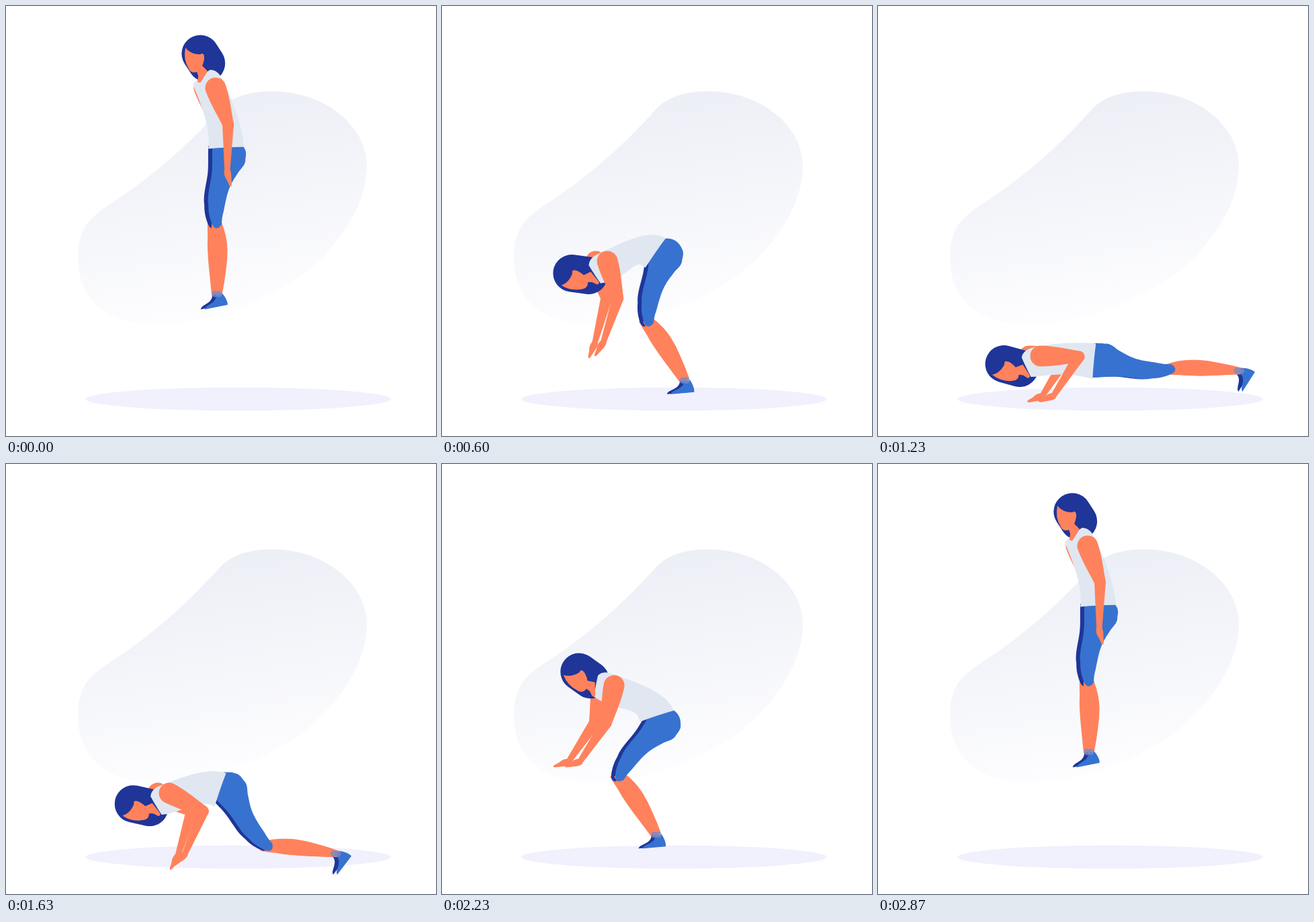
Animation of 640x640 px, one loop 2.93 s. Source, as an HTML page with a canvas:

```html
<!DOCTYPE html>
<html lang="en">
<head>
<meta charset="utf-8">
<title>Burpee</title>
<style>
html, body { margin: 0; width: 100%; height: 100%; overflow: hidden; background: #fff }
canvas { display: block; width: 640px; height: 640px }
</style>
</head>
<body>
<canvas id="stage" width="640" height="640"></canvas>
<script>
const ctx = document.getElementById('stage').getContext('2d');
const LOOP = 2930;
const SKIN = '#ff825c', NAVY = '#1f3598', BLUE = '#3772d0', SHIRT = '#e0e7f1';
const THIGH = 98.5, SHIN = 105, UPPER = 57, FORE = 70;

// A pose: shoulder, hip and ankle points, then upper arm and forearm angles
// in degrees from straight down. Everything else follows from these.
const stand = [312, 122, 331, 227, 317, 428.6, 19, -1];
const drop  = [252, 263, 329, 316, 344, 504, 10, -11.5];
const land  = [246, 358, 332, 360, 353, 551, 14, -16];
const kick  = [247, 443, 333, 428, 449, 570, 26, -27];
const plank = [242, 521, 338, 528, 540.5, 543, 89, -33];
const tuck  = [243, 490, 335, 488, 494, 580, 62, -23];
const squat = [256, 330, 327, 390, 322, 552, -12, -34];
const leap  = [298, 172, 331, 274, 321, 476, 55, 62];
const keys = [[0, stand], [370, drop], [530, land], [870, kick], [1130, plank],
  [1300, plank], [1630, tuck], [2230, squat], [2670, leap], [2870, stand]];

const shape = d => new Path2D(d);
const shorts = shape('M-27-14C-24 5-21 14-20 28C-19 45-21 60-16 74C-14 86-9 95-5 101Q3 111 9 98Q7 90 8 78C8 62 8 52 10 42C12 32 16 24 19 16C23 9 27 3 25-4C25-12 24-16 20-20C10-33-8-34-27-14Z');
const calf = shape('M-6-4Q-7 8-7 20Q-8 30-8 40Q-8 55-7 70L-5 107L5 104Q9 88 12 70Q15 55 15.5 40Q16 20 9 0Z');
const shoe = shape('M5-1C9 4 13 10 13 16L-21 23C-19 15-4 15-4 2Z');
const upperArm = shape('M-15.5 0A15.5 15.5 0 0 1 15.5 0C15.5 20 11 40 8.5 57A8.5 8.5 0 0 1-8.5 57C-10 42-15 22-15.5 0Z');
const foreArm = shape('M-8.5 0A8.5 8.5 0 0 1 8.5 0L4 71L-4 71Z');
const palm = shape('M-4-3Q-7 6-3 13L-1 22Q1 25 2.5 21L4 11Q6 3 4-3Z');
const face = shape('M-22-9C-17-2-8 1 0 1Q6-3 6 7Q5 14 3 18L11 26L1 42Q-2 45-4 41L-3 33L-5 27Q-13 30-17 23Q-26 8-22-9Z');
const blob = shape('M320 152C340 132 370 127 396 127C476 127 537 180 537 237C537 310 478 370 450 393C390 440 300 474 222 474C150 474 107 435 107 376C107 318 136 309 180 278C240 236 285 191 320 152Z');

const glow = ctx.createLinearGradient(300, 130, 360, 475);
glow.addColorStop(0, '#eceef6');
glow.addColorStop(1, '#fefeff');

const rad = a => a * Math.PI / 180;
const angle = (p, q) => Math.atan2(q[0] - p[0], q[1] - p[1]) * 180 / Math.PI;

// Point (x, y) of a frame at p whose down axis is turned by angle a.
function place(p, a, x, y) {
  const c = Math.cos(rad(a)), s = Math.sin(rad(a));
  return [p[0] + x * c + y * s, p[1] - x * s + y * c];
}

function part(path, p, a, color) {
  ctx.save();
  ctx.translate(...p);
  ctx.rotate(-rad(a));
  ctx.fillStyle = color;
  ctx.fill(path);
  ctx.restore();
}

// Monotone cubic interpolation of value n of the poses, at rest at both ends.
function sample(n, t) {
  const last = keys.length - 1;
  let k = 0;
  while (k < last - 1 && t >= keys[k + 1][0]) k++;
  const span = i => keys[i + 1][0] - keys[i][0];
  const rate = i => (keys[i + 1][1][n] - keys[i][1][n]) / span(i);
  const slope = i => {
    if (i === 0 || i === last) return 0;
    const a = rate(i - 1), b = rate(i);
    return a * b <= 0 ? 0 : 2 * a * b / (a + b);
  };
  const h = span(k), u = Math.min(1, (t - keys[k][0]) / h), w = 1 - u;
  return keys[k][1][n] * w * w * (1 + 2 * u) + keys[k + 1][1][n] * u * u * (3 - 2 * u)
    + h * u * w * (slope(k) * w - slope(k + 1) * u);
}

function arm(shoulder, upper, fore) {
  const elbow = place(shoulder, upper, 0, UPPER);
  const wrist = place(elbow, fore, 0, FORE);
  // The palm flattens as the forearm reaches forward.
  part(palm, wrist, 14 + fore * (fore < 0 ? 2.6 : 1), SKIN);
  part(foreArm, elbow, fore, SKIN);
  part(upperArm, shoulder, upper, SKIN);
}

// Two-bone solution with the knee in front.
function kneeOf(hip, ankle) {
  const d = Math.min(Math.hypot(ankle[0] - hip[0], ankle[1] - hip[1]), THIGH + SHIN - .1);
  const along = (THIGH ** 2 - SHIN ** 2 + d * d) / (2 * d);
  return place(hip, angle(hip, ankle), -Math.sqrt(THIGH ** 2 - along ** 2), along);
}

function leg(dx, hip, knee, ankle, color) {
  const shin = angle(knee, ankle);
  const shift = p => [p[0] + dx, p[1]];
  part(calf, shift(knee), shin, SKIN);
  part(shoe, shift(ankle), Math.max(-.2 * shin, 1.05 * shin - 48), color);
  part(shorts, shift(hip), angle(hip, knee), color);
}

function dot(x, y) {
  ctx.fillStyle = 'rgba(118,138,200,.78)';
  ctx.beginPath();
  ctx.arc(x, y, 4.8, 0, 7);
  ctx.fill();
}

// The hair flies up during the drop.
function drawHair(crown, bend, t) {
  const lift = Math.exp(-(((t - 370) / 130) ** 2));
  ctx.strokeStyle = NAVY;
  ctx.lineWidth = 55.5;
  ctx.lineCap = 'round';
  ctx.beginPath();
  ctx.moveTo(...crown);
  ctx.lineTo(...place(crown, 33 + .55 * bend + 83 * lift, 0, 17 + .1 * bend + 10 * lift));
  ctx.stroke();
}

function drawShirt(shoulder, hip, lean, thigh) {
  const tilt = .65 * lean + .35 * thigh;
  const top = (x, y) => place(shoulder, lean, x, y);
  const waist = (x, y) => place(hip, tilt, x, y - 18);
  ctx.fillStyle = SHIRT;
  ctx.beginPath();
  ctx.moveTo(...top(-4, -28));
  ctx.quadraticCurveTo(...top(5, -27), ...top(10, -17));
  ctx.bezierCurveTo(...top(19, 8), ...waist(24, -30), ...waist(24, 2));
  ctx.quadraticCurveTo(...waist(0, 1), ...waist(-29, 2));
  ctx.bezierCurveTo(...waist(-25, -20), ...top(-22, 36), ...top(-31, -4));
  ctx.lineTo(...top(-32, -12));
  ctx.quadraticCurveTo(...top(-16, -22), ...top(-4, -28));
  ctx.fill();
}

function draw(t) {
  const [sx, sy, hx, hy, ax, ay, upper, fore] = stand.map((_, n) => sample(n, t));
  const shoulder = [sx, sy], hip = [hx, hy], ankle = [ax, ay];
  const knee = kneeOf(hip, ankle);
  const lean = angle(shoulder, hip), bend = lean - 10.3;
  const nod = 5 * Math.sin(rad(2 * bend));
  const crown = place(shoulder, lean + nod, -13.4, -54.3);

  ctx.fillStyle = '#fff';
  ctx.fillRect(0, 0, 640, 640);
  ctx.fillStyle = glow;
  ctx.fill(blob);
  ctx.fillStyle = '#f1f0fd';
  ctx.beginPath();
  ctx.ellipse(345.5, 585, 227, 17.3, 0, 0, 7);
  ctx.fill();

  arm([sx - 17, sy], upper, fore + Math.max(0, 7 * Math.sin(rad(2 * upper))));
  drawHair(crown, bend, t);
  leg(-6, hip, knee, ankle, NAVY);
  leg(0, hip, knee, ankle, BLUE);
  dot(ax - 6, ay);
  dot(ax, ay);
  drawShirt(shoulder, hip, lean, angle(hip, knee));
  part(face, crown, .86 * bend, SKIN);
  arm(shoulder, upper, fore);
}

const start = performance.now();
function tick() {
  draw((performance.now() - start) % LOOP);
  requestAnimationFrame(tick);
}
tick();
</script>
</body>
</html>
```
